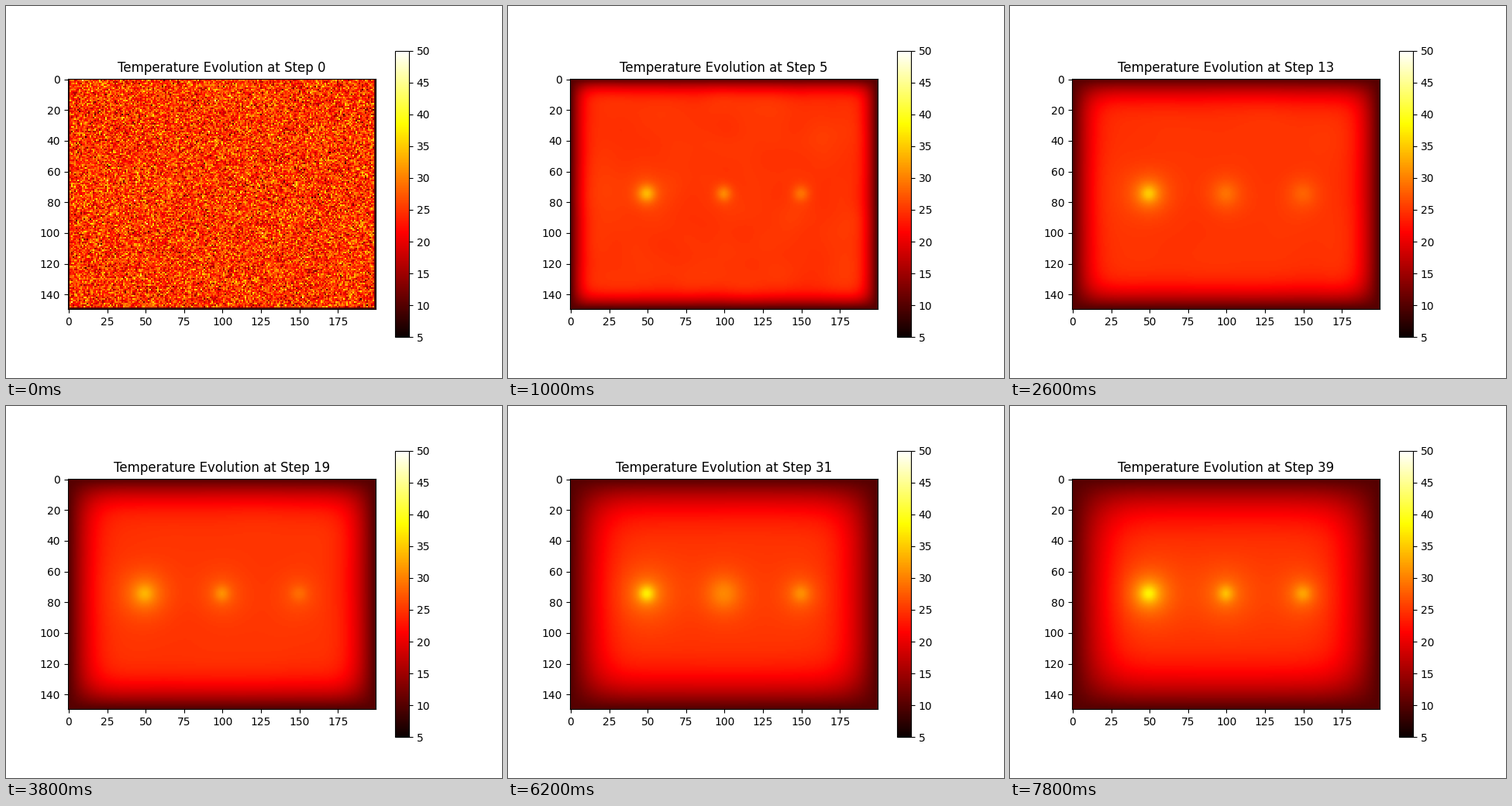
A matplotlib script for the animation above (8000 ms loop, 640 by 480 pixels).

```python
import numpy as np
import matplotlib.pyplot as plt
from matplotlib.animation import FuncAnimation

ROWS, COLS, STEPS = 150, 200, 40
EDGE, MEAN, SPREAD = 10, 25, 5
RATE, SUBSTEPS = 0.2, 25
HEAT = 3.8 * 4 * np.pi * RATE * SUBSTEPS  # given off per step at full power

# each heater's power rises and falls linearly between these steps
KEY_STEPS = [1, 5, 13, 24, 31, 39]
POWER = {
    50: [1, 1, 0.72, 0.22, 1.2, 0.77],
    100: [0, 0.95, 0.11, 1, 0, 0.84],
    150: [0, 0.7, 0.1, 0.5, 0.43, 0.57],
}


def diffuse(t):
    core = t[1:-1, 1:-1]
    around = t[:-2, 1:-1] + t[2:, 1:-1] + t[1:-1, :-2] + t[1:-1, 2:]
    core += RATE * (around - 4 * core)


def simulate():
    rng = np.random.RandomState(42)
    t = rng.normal(MEAN, SPREAD, (ROWS, COLS))
    t[[0, -1], :] = EDGE
    t[:, [0, -1]] = EDGE
    fields = [t.copy()]
    mid = ROWS // 2
    for step in range(1, STEPS):
        for col, levels in POWER.items():
            heat = HEAT * np.interp(step, KEY_STEPS, levels)
            t[mid - 1:mid + 1, col - 1:col + 1] += heat / 4
        for _ in range(SUBSTEPS):
            diffuse(t)
        fields.append(t.copy())
    return fields


fields = simulate()
fig, ax = plt.subplots(figsize=(6.4, 4.8), dpi=100)
image = ax.imshow(fields[0], cmap="hot", vmin=5, vmax=50,
                  interpolation="nearest")
fig.colorbar(image, ax=ax)
title = ax.set_title("Temperature Evolution at Step 0")


def update(step):
    image.set_data(fields[step])
    title.set_text(f"Temperature Evolution at Step {step}")
    return image, title


anim = FuncAnimation(fig, update, frames=STEPS, interval=200,
                     repeat=True, repeat_delay=0)
plt.show()
```
